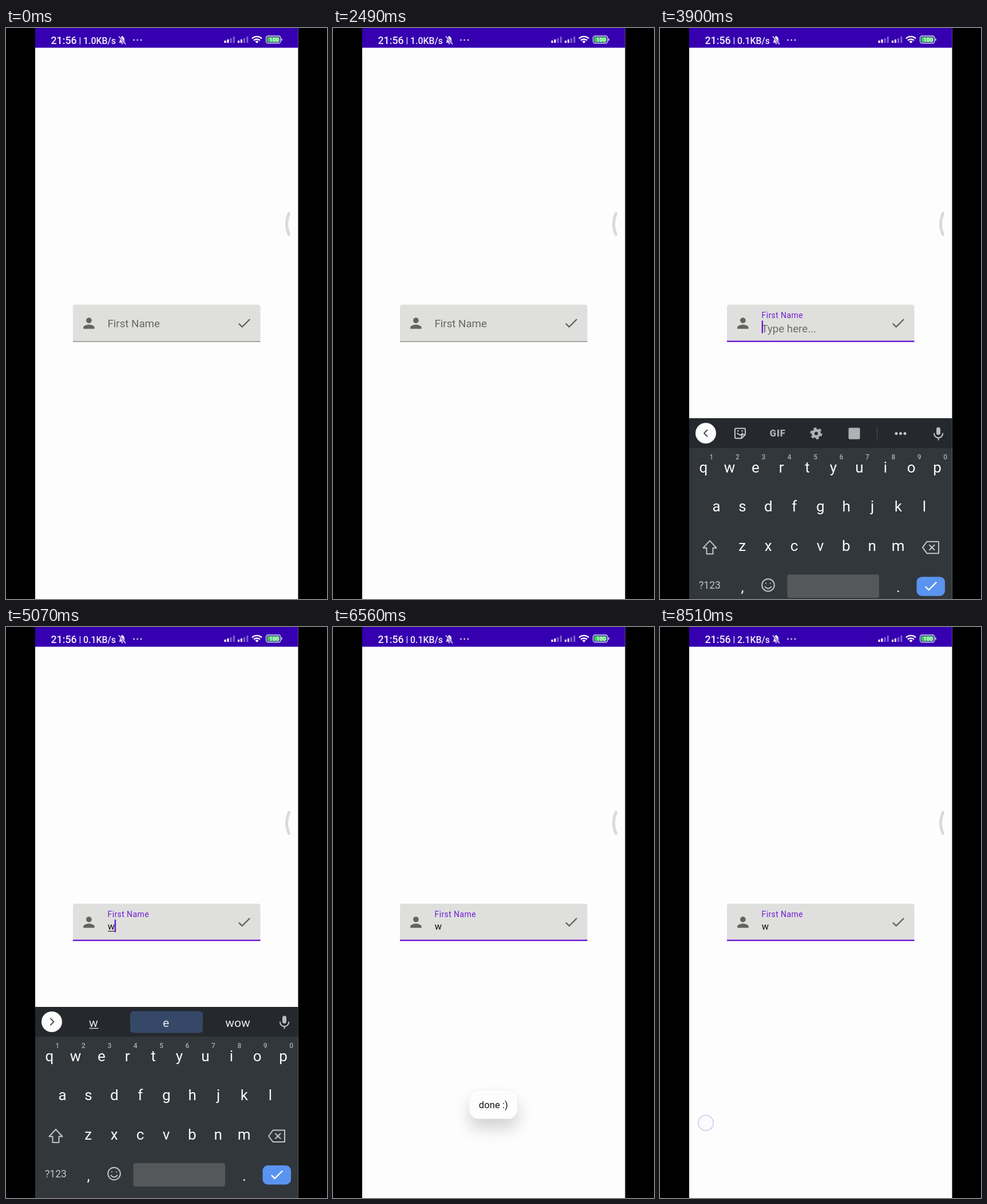
These frames come from a looping animation (561 by 998 pixels, 8.55 s). An HTML page:

```html
<!DOCTYPE html>
<html lang="en">
<head>
<meta charset="utf-8">
<title>Text field with a done action</title>
<style>
  html, body { margin: 0; width: 100%; height: 100%; overflow: hidden; background: #000; }
  svg { display: block; width: 561px; height: 998px; font-family: Roboto, "Noto Sans", sans-serif; }
  .mid { text-anchor: middle; }
  .line { fill: none; stroke: #c3c6c8; stroke-width: 2; stroke-linejoin: round; stroke-linecap: round; }
  .key { font-size: 26px; fill: #fafafa; }
  .hint { font-size: 12px; font-weight: 500; fill: #a9adb0; }
  .word { font-size: 21px; fill: #e8eaed; }

  /* One shared clock; "cut" parts switch without easing. */
  .anim { animation: 8550ms linear infinite both; }
  .cut { animation-timing-function: step-end; }

  .rate-a { animation-name: rateA; }
  .rate-b { animation-name: rateB; }
  .rate-c { animation-name: rateC; }
  .idle { animation-name: idle; }
  .focus { animation-name: focus; }
  .label { animation-name: label; }
  .holder { animation-name: holder; }
  .typed { animation-name: typed; }
  .compose { animation-name: compose; }
  .blink { animation-name: blink; }
  .caret { animation-name: caret; }
  .keyboard { animation-name: keyboard; }
  .tools { animation-name: tools; }
  .words { animation-name: typed; }
  .toast { animation-name: toast; transform-origin: 280px 834px; }
  .touch { animation-name: touch; }

  @keyframes rateA { 0% { opacity: 1 } 40.58%, 100% { opacity: 0 } }
  @keyframes rateB { 0% { opacity: 0 } 40.58% { opacity: 1 } 87.37%, 100% { opacity: 0 } }
  @keyframes rateC { 0% { opacity: 0 } 87.37%, 100% { opacity: 1 } }
  @keyframes idle { 0% { opacity: 1 } 40.7%, 100% { opacity: 0 } }
  @keyframes focus { 0% { opacity: 0 } 40.7%, 100% { opacity: 1 } }
  @keyframes label {
    0%, 40.7% {
      font-size: 18.7px; letter-spacing: 0; fill: #666664; transform: translateY(15.5px);
      animation-timing-function: cubic-bezier(.4, 0, .2, 1);
    }
    42.65%, 100% { font-size: 14px; letter-spacing: .4px; fill: #6f1fd2; transform: none; }
  }
  @keyframes holder {
    0%, 41.2% { opacity: 0 }
    42.65% { opacity: 1; animation-timing-function: step-end }
    55.2%, 100% { opacity: 0 }
  }
  @keyframes typed { 0% { opacity: 0 } 55.2%, 100% { opacity: 1 } }
  @keyframes compose { 0% { opacity: 0 } 55.2% { opacity: 1 } 68.3%, 100% { opacity: 0 } }
  @keyframes tools { 0% { opacity: 1 } 55.2%, 100% { opacity: 0 } }
  @keyframes blink {
    0% { opacity: 0 }
    40.7% { opacity: 1 } 46.55% { opacity: 0 }
    52.4% { opacity: 1 } 61.05% { opacity: 0 }
    66.9% { opacity: 1 } 72.75% { opacity: 0 }
    78.6% { opacity: 1 } 84.44% { opacity: 0 }
    90.29% { opacity: 1 } 96.14%, 100% { opacity: 0 }
  }
  @keyframes caret { 0% { transform: none } 55.2%, 100% { transform: translateX(12px) } }
  @keyframes keyboard {
    0%, 43.27% { transform: translateY(340px); animation-timing-function: cubic-bezier(.33, 1, .68, 1) }
    47.02%, 68.54% { transform: none; animation-timing-function: cubic-bezier(.33, 0, .67, .33) }
    71.87%, 100% { transform: translateY(340px) }
  }
  @keyframes toast {
    0%, 68.3% {
      opacity: 0; transform: translateY(35px) scale(.6);
      animation-timing-function: cubic-bezier(.33, .67, .67, 1);
    }
    69.55% { opacity: 1 }
    71.81%, 91.7% { opacity: 1; transform: none }
    95.2%, 100% { opacity: 0; transform: none }
  }
  @keyframes touch { 0% { opacity: 0 } 99.06%, 100% { opacity: 1 } }
</style>
</head>
<body>
<svg viewBox="0 0 561 998">
  <defs>
    <filter id="shadow" x="-80%" y="-80%" width="260%" height="300%">
      <feDropShadow dx="0" dy="17" stdDeviation="13" flood-color="#000" flood-opacity=".16"/>
    </filter>
    <path id="check" d="M9 16.17 4.83 12l-1.42 1.41L9 19 21 7l-1.41-1.41z"/>
    <g id="bars">
      <path d="M0 22h3v4h-3zM4.9 20h3v6h-3z" fill="#fff"/>
      <path d="M10 18h3v8h-3zM15.3 15h3v11h-3z" fill="#fff" opacity=".38"/>
    </g>
  </defs>

  <rect width="561" height="998"/>
  <rect x="51" width="459.5" height="998" fill="#fdfdfd"/>

  <!-- Status bar -->
  <rect x="51" width="459.5" height="34.5" fill="#3600b0"/>
  <g fill="#f2effb" font-weight="500">
    <text x="78.5" y="28" font-size="17.8">21:56</text>
    <text x="127.5" y="27" font-size="15.5">|</text>
    <g font-size="15.9">
      <text class="anim cut rate-a" x="135" y="27.5">1.0KB/s</text>
      <text class="anim cut rate-b" x="135" y="27.5">0.1KB/s</text>
      <text class="anim cut rate-c" x="135" y="27.5">2.1KB/s</text>
    </g>
    <path d="M197 25.5c2-1.500 2-3 2-5.500 0-2.800 1.500-4.500 3.200-5v-1h1.600v1c2 .5 3.200 2.200 3.200 5 0 2.500 0 4 2 5.500zM201.200 26.500h3.600a1.800 1.800 0 0 1-3.600 0z"/>
    <path d="M197 14.500 209 28.500" stroke="#3600b0" stroke-width="3"/>
    <path d="M197 14.500 209 28.500" stroke="#f2effb" stroke-width="1.300"/>
    <circle cx="223.500" cy="21" r="1.300"/><circle cx="229.700" cy="21" r="1.300"/><circle cx="236" cy="21" r="1.300"/>
  </g>
  <use href="#bars" x="381.500"/><use href="#bars" x="405"/>
  <g fill="none" stroke="#fff" stroke-width="2.300">
    <path d="M430 18.300a12.500 12.500 0 0 1 17 0M433 21.700a8 8 0 0 1 11 0"/>
    <path d="M435.500 23.700a4.500 4.500 0 0 1 6 0L438.500 26.800z" fill="#fff" stroke="none"/>
  </g>
  <rect x="454.500" y="14" width="25.500" height="12.500" rx="3.500" fill="none" stroke="#e8e4f5" stroke-width="1.300"/>
  <rect x="456.300" y="15.800" width="21.900" height="8.900" rx="2" fill="#3ccb5c"/>
  <rect x="481.200" y="18.300" width="1.500" height="4" rx=".7" fill="#e8e4f5"/>
  <text class="mid" x="468.500" y="24" font-size="9.500" font-weight="700" fill="#fff">100</text>

  <path d="M494.500 324Q486.500 343 494.500 361" fill="none" stroke="#dadade" stroke-width="5" stroke-linecap="round"/>

  <!-- Text field -->
  <path d="M117 548.500V488q0-4.500 4.500-4.500H440q4.500 0 4.500 4.500V548.500z" fill="#dfdfde"/>
  <rect class="anim cut idle" x="117" y="547.500" width="327.500" height="1.200" fill="#7d7d7b"/>
  <rect class="anim cut focus" x="117" y="546.500" width="327.500" height="2.400" fill="#6a18d2"/>
  <g fill="#636361">
    <path transform="translate(130.300 501.400) scale(1.220)" d="M12 12a4 4 0 1 0 0-8 4 4 0 0 0 0 8zm0 2c-2.670 0-8 1.340-8 4v2h16v-2c0-2.660-5.330-4-8-4z"/>
    <use href="#check" transform="translate(402 501.500) scale(1.190)"/>
  </g>
  <text class="anim label" x="177.500" y="507">First Name</text>
  <text class="anim holder" x="177.500" y="531.500" font-size="18.700" fill="#6c6c6a">Type here...</text>
  <text class="anim cut typed" x="177.700" y="529" font-size="16.400" fill="#111">w</text>
  <rect class="anim cut compose" x="178" y="531" width="12" height="1.200" fill="#222"/>
  <g class="anim cut blink">
    <rect class="anim cut caret" x="177.700" y="511.500" width="2.400" height="22" fill="#6a18d2"/>
  </g>

  <!-- Keyboard -->
  <g class="anim keyboard">
    <rect x="51" y="664" width="459.500" height="350" fill="#32373b"/>
    <rect x="51" y="664" width="459.500" height="52" fill="#25292d"/>
    <circle cx="80" cy="690" r="18" fill="#fcfcfc"/>

    <g class="anim cut tools">
      <path class="line" d="M82.500 684.500 77 690l5.500 5.500" style="stroke: #4a4e52"/>
      <path class="line" d="M133 681.500h14q2 0 2 2v9l-6.500 6.500h-9.500q-2 0-2-2v-13.500q0-2 2-2M142.500 699v-4.500q0-2 2-2h4.500M135 690q5 6 9.500 0M135.500 686h1.500M143 686h1.500"/>
      <text class="mid" x="205.700" y="696" font-size="16.500" font-weight="900" letter-spacing=".8" fill="#aeb2b5">GIF</text>
      <g fill="none" stroke="#aeb2b5">
        <circle cx="273" cy="690.500" r="5.500" stroke-width="5"/>
        <circle cx="273" cy="690.500" r="8.800" stroke-width="3.500" stroke-dasharray="4.600 4.615"/>
      </g>
      <rect x="329.500" y="680.500" width="20" height="20" rx="2" fill="#aeb2b5"/>
      <path d="M379.500 678v25" stroke="#44494d" stroke-width="1.200"/>
      <g fill="#c3c6c8"><circle cx="413" cy="690.500" r="2.500"/><circle cx="420.500" cy="690.500" r="2.500"/><circle cx="428" cy="690.500" r="2.500"/></g>
    </g>

    <g class="anim cut words">
      <path class="line" d="M78 684.500l5.500 5.500-5.500 5.500" style="stroke: #4a4e52"/>
      <rect x="217" y="671.500" width="127" height="38" rx="6" fill="#354867"/>
      <text class="word mid" x="153" y="698.500">w</text>
      <path d="M145.500 701.500h16" stroke="#e8eaed" stroke-width="1.300"/>
      <text class="word mid" x="279.500" y="698.500">e</text>
      <text class="word mid" x="405" y="698.500">wow</text>
    </g>

    <rect x="483" y="679.500" width="7" height="13.500" rx="3.500" fill="#b9bcbf"/>
    <path class="line" d="M479 690.500a7.600 7.600 0 0 0 15.200 0M486.600 698.500v3"/>

    <g id="keys"></g>

    <path class="line" d="M87 878 75.500 890.500h6v10.500h11v-10.500h6z" stroke-linejoin="miter"/>
    <path class="line" d="M466.500 879.500h20.500v20.500h-20.500l-7.500-10.250zM471 885.500l8.500 8.500M479.500 885.500l-8.500 8.500"/>
    <text class="mid" x="87" y="962" font-size="17.600" fill="#c3c6c8">?123</text>
    <text class="key mid" x="144" y="968">,</text>
    <circle class="line" cx="189" cy="955.500" r="10.800"/>
    <path class="line" d="M183.500 958.500q5.500 6 11 0M185 952.200v.4M193 952.200v.4"/>
    <rect x="222.500" y="937" width="160.500" height="41" rx="4" fill="#54585b"/>
    <text class="key mid" x="416.500" y="968">.</text>
    <rect x="448.500" y="941" width="49.500" height="33.500" rx="9" fill="#5a94f0"/>
    <use href="#check" transform="translate(459 943) scale(1.190)" fill="#fff"/>
  </g>

  <!-- Toast -->
  <g class="anim toast">
    <rect x="238" y="809" width="84.500" height="50.500" rx="17" fill="#fdfdfd" stroke="#ececec" stroke-width=".8" filter="url(#shadow)"/>
    <text class="mid" x="280.300" y="840.500" font-size="16.700" fill="#161616">done :)</text>
  </g>

  <circle class="anim cut touch" cx="80" cy="866.700" r="13.300" fill="#fbfbfd" stroke="#cfd2ea" stroke-width="1.800"/>
</svg>
<script>
  const keys = document.getElementById("keys");

  function addText(text, x, y, style) {
    const el = document.createElementNS("http://www.w3.org/2000/svg", "text");
    el.setAttribute("class", style + " mid");
    el.setAttribute("x", x);
    el.setAttribute("y", y);
    el.textContent = text;
    keys.append(el);
  }

  const pitch = 45.4;
  const rows = [["qwertyuiop", 76, 759], ["asdfghjkl", 98.6, 827], ["zxcvbnm", 143.8, 896]];
  for (const [letters, x, y] of rows)
    [...letters].forEach((c, i) => addText(c, x + i * pitch, y, "key"));
  [..."1234567890"].forEach((c, i) => addText(c, 90 + i * pitch, 736, "hint"));
</script>
</body>
</html>
```
